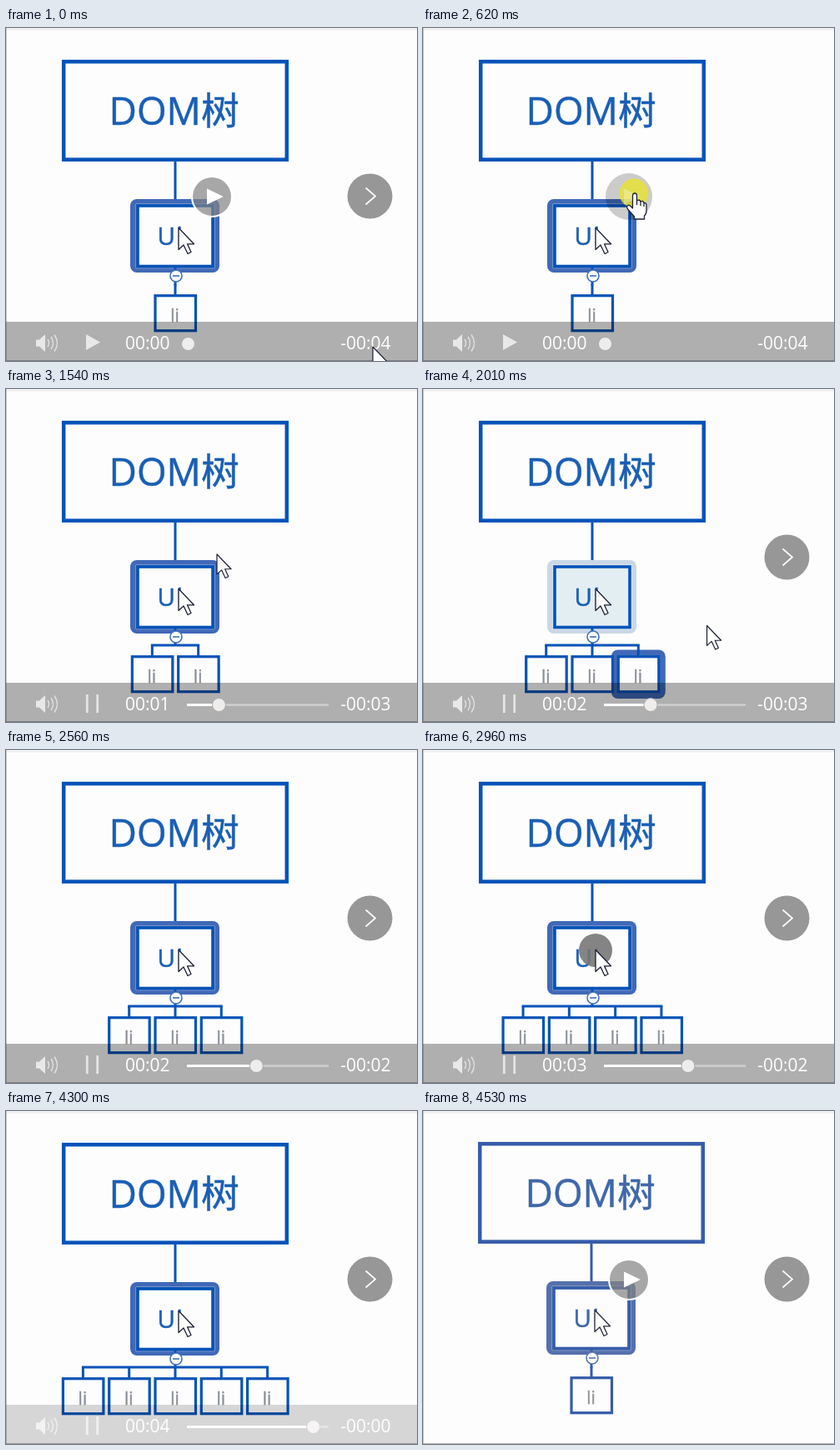
These frames come from a looping animation (493x399 px, 4760 ms). An HTML page:

```html
<!DOCTYPE html>
<html lang="zh">
<head>
<meta charset="utf-8">
<title>DOM树</title>
<style>
  html, body { margin: 0; width: 100%; height: 100%; overflow: hidden; background: #fdfdfd; }
  svg { display: block; width: 493px; height: 399px; font-family: "Open Sans", "Noto Sans CJK SC", sans-serif; }
  .node { fill: #fdfdfd; stroke: #0553b8; }
  .link { fill: none; stroke: #0553b8; stroke-width: 3; }
  .label { fill: #1a5fb5; stroke: #1a5fb5; stroke-width: 0.5; }
  .item { fill: #8a9097; stroke: #8a9097; stroke-width: 0.4; font-size: 21px; text-anchor: middle; }
  .time { fill: #fff; font-size: 21px; }
  .cursor { fill: #fff; stroke: #1c1f33; stroke-width: 1.3; stroke-linejoin: round; }
</style>
</head>
<body>
<svg viewBox="0 0 493 399">
  <defs>
    <path id="arrow" d="M0 0V26L6 20.5L11 31L15 29L10.5 19.3H18.5Z"/>
    <filter id="soft">
      <feGaussianBlur stdDeviation="0.75"/>
      <feColorMatrix type="saturate" values="0.75"/>
    </filter>
  </defs>
  <rect width="493" height="399" fill="#fdfdfd"/>
  <rect width="493" height="3" fill="#f1f1f1"/>
  <path d="M0.5 0V399" stroke="#c8c8c8"/>
  <path d="M0 398.5H493" stroke="#b0b0b0"/>

  <g id="diagram">
    <path class="link" d="M203 160V212"/>
    <rect class="node" x="69.2" y="40.3" width="267.6" height="117.4" stroke-width="4.5"/>
    <text class="label" x="123.5" y="115.5" font-size="45.8">DOM树</text>
    <rect id="glow" x="149" y="205" width="107" height="88" rx="8"/>
    <rect x="155.6" y="210.6" width="94.8" height="77.3" rx="1" fill="none" stroke="#fff" stroke-opacity="0.3"/>
    <rect id="parent" class="node" x="158" y="213" width="90" height="72.5" stroke-width="3.6"/>
    <text class="label" x="181.5" y="260" font-size="29.5" letter-spacing="1.5">Ul</text>
    <g id="branches"></g>
    <g fill="#fdfdfd" stroke="#3f70bd" stroke-width="1.6">
      <circle cx="204" cy="297" r="7"/>
      <path d="M200 297H208"/>
    </g>
    <circle id="tap" cx="207" cy="240" r="20" fill="#777" opacity="0.9"/>
    <use href="#arrow" class="cursor" x="207" y="239.5"/>
  </g>

  <g id="bar">
    <rect y="352" width="493" height="47" opacity="0.31"/>
    <path d="M36 373.5H40L47 367V388L40 381.5H36Z" fill="#e8e8e8"/>
    <path d="M50 373Q53 377.5 50 382M54 370Q59 377.5 54 385M58 367.5Q65 377.5 58 387.5"
          fill="none" stroke="#e0e0e0" stroke-width="1.5"/>
    <path id="playIcon" d="M96 367V386L113 376.5Z" fill="#e8e8e8"/>
    <path id="pauseIcon" d="M97.3 366V388M109.7 366V388" stroke="#e4e4e4" stroke-width="2.8"/>
    <text id="elapsed" class="time" x="143" y="384.5"></text>
    <text id="remaining" class="time" x="461.5" y="384.5" text-anchor="end"></text>
    <g id="track">
      <path d="M217 378.5H387" stroke="#cfcfcf" stroke-width="2.5"/>
      <path id="played" stroke="#fff" stroke-width="3"/>
    </g>
    <circle id="knob" cy="378.5" r="8" fill="#efecec" stroke="#aaa"/>
  </g>

  <g id="next">
    <circle cx="436.5" cy="201.5" r="27" fill="#979797"/>
    <path d="M431.5 191.5L443 201.5L431.5 211.5" fill="none" stroke="#fff" stroke-width="1.7"/>
  </g>
  <g id="bigPlay">
    <circle cx="247" cy="202" r="24" fill="#838383" fill-opacity="0.7" stroke="#fff" stroke-width="2"/>
    <path d="M241 192.5V211.5L261 202Z" fill="#fff"/>
  </g>
  <circle id="pressed" cx="247" cy="202" r="28" opacity="0.2"/>
  <g id="click">
    <circle cx="253" cy="198" r="17.5" fill="#e6e236" opacity="0.84"/>
    <path d="M241 192.5V211.5L261 202Z" fill="#fff" opacity="0.3"/>
  </g>
  <path id="hand" class="cursor" d="M251.5 213V201Q251.5 198 254 198T256.5 201V207Q260 205 261 208Q264 206.5 265 209.5Q268 209 268 213V219Q268 223 265.5 225V229H253.5V226L245.5 217Q243.5 213.5 246 212.5Q248 212 251.5 216ZM256.5 207V212M261 208V213M265 209.5V214"/>
  <use id="pointer" href="#arrow" class="cursor"/>
</svg>

<script>
const LOOP = 4760, PLAY = 700, END = 4460;
const ticks = [990, 1160, 1310, 1540, 1740, 1940, 2180, 2360, 2560, 2760,
               2960, 3160, 3360, 3590, 3740, 3910, 4110, 4310];
// Each round adds a list item, then clicks its parent again.
const rounds = [[930, 1160], [1820, 2090], [2640, 2890], [3490, 3990]];
const BLUE_GLOW = '#4069b7', HOVER_GLOW = '#cad8e6';

const el = id => document.getElementById(id);
const set = (id, attrs) => {
  for (const name in attrs) el(id).setAttribute(name, attrs[name]);
};
const show = (id, visible) => set(id, { visibility: visible ? 'visible' : 'hidden' });
const between = (t, from, to) => t >= from && t < to;
const ramp = (t, from, to) => Math.min(1, Math.max(0, (t - from) / (to - from)));
const smooth = p => p * p * (3 - 2 * p);
const mix = (a, b, p) => a + (b - a) * p;

function branches(count, selected) {
  const centers = Array.from({ length: count }, (_, i) => 203 + (i - (count - 1) / 2) * 55.3);
  const last = centers[count - 1];
  let out = `<path class="link" d="M203 287V307M${centers[0] - 1.5} 307H${last + 1.5}"/>`;
  if (selected) {
    out += `<rect x="${last - 32.5}" y="312.5" width="65" height="58.5" rx="8" fill="${BLUE_GLOW}"/>`;
  }
  for (const x of centers) {
    out += `<path class="link" d="M${x} 307V320"/>
      <rect class="node" x="${x - 24}" y="320.7" width="48.5" height="42" stroke-width="3.2"/>
      <text class="item" x="${x - 0.5}" y="351.5">li</text>`;
  }
  return out;
}

function drawDiagram(t) {
  const ended = t >= END;
  const done = ended ? [] : rounds.filter(([add]) => t >= add);
  const selected = done.length > 0 && t < done[done.length - 1][1];
  el('branches').innerHTML = branches(done.length + 1, selected);
  set('glow', { fill: selected ? HOVER_GLOW : BLUE_GLOW });
  el('parent').style.fill = selected ? '#e3eef3' : '#fdfdfd';
  show('tap', done.some(([, click]) => between(t, click, click + 150)));
  set('diagram', {
    transform: ended ? 'translate(-1 -1)' : '',
    filter: ended ? 'url(#soft)' : 'none',
    opacity: ended ? 0.95 : 1
  });
}

function drawPlayer(t) {
  const playing = between(t, PLAY - 10, END);
  const tick = ticks.filter(time => time <= t).pop() || PLAY;
  const seconds = (tick - PLAY) / 1000;
  const x = 218.5 + seconds * 44;
  el('elapsed').textContent = '00:0' + Math.ceil(seconds);
  el('remaining').textContent = '-00:0' + Math.round(3.77 - seconds);
  set('knob', { cx: x });
  set('played', { d: `M217 378.5H${x}` });
  show('track', playing);
  show('pauseIcon', playing);
  show('playIcon', !playing);
  show('bigPlay', t < 620 || t >= END);
  show('pressed', between(t, 620, PLAY - 10));
  set('bar', { opacity: 1 - ramp(t, 4220, 4380) });
  set('next', { opacity: 1 - ramp(t, 200, 420) + ramp(t, 1760, 2000) });
}

function drawPointer(t) {
  const arrive = smooth(ramp(t, 70, 540)), leave = smooth(ramp(t, 1690, 2410));
  const x = mix(mix(440, 253, arrive), 462, leave);
  const y = mix(mix(382, 198, arrive), 402, leave);
  const hand = between(t, 540, 930);
  set('pointer', { transform: `translate(${x} ${y}) scale(0.92)` });
  show('pointer', !hand && t < 2410);
  show('hand', hand);
  show('click', between(t, 620, 760));
}

const start = performance.now();
function frame() {
  const t = (performance.now() - start) % LOOP;
  drawDiagram(t);
  drawPlayer(t);
  drawPointer(t);
  requestAnimationFrame(frame);
}
frame();
</script>
</body>
</html>
```
